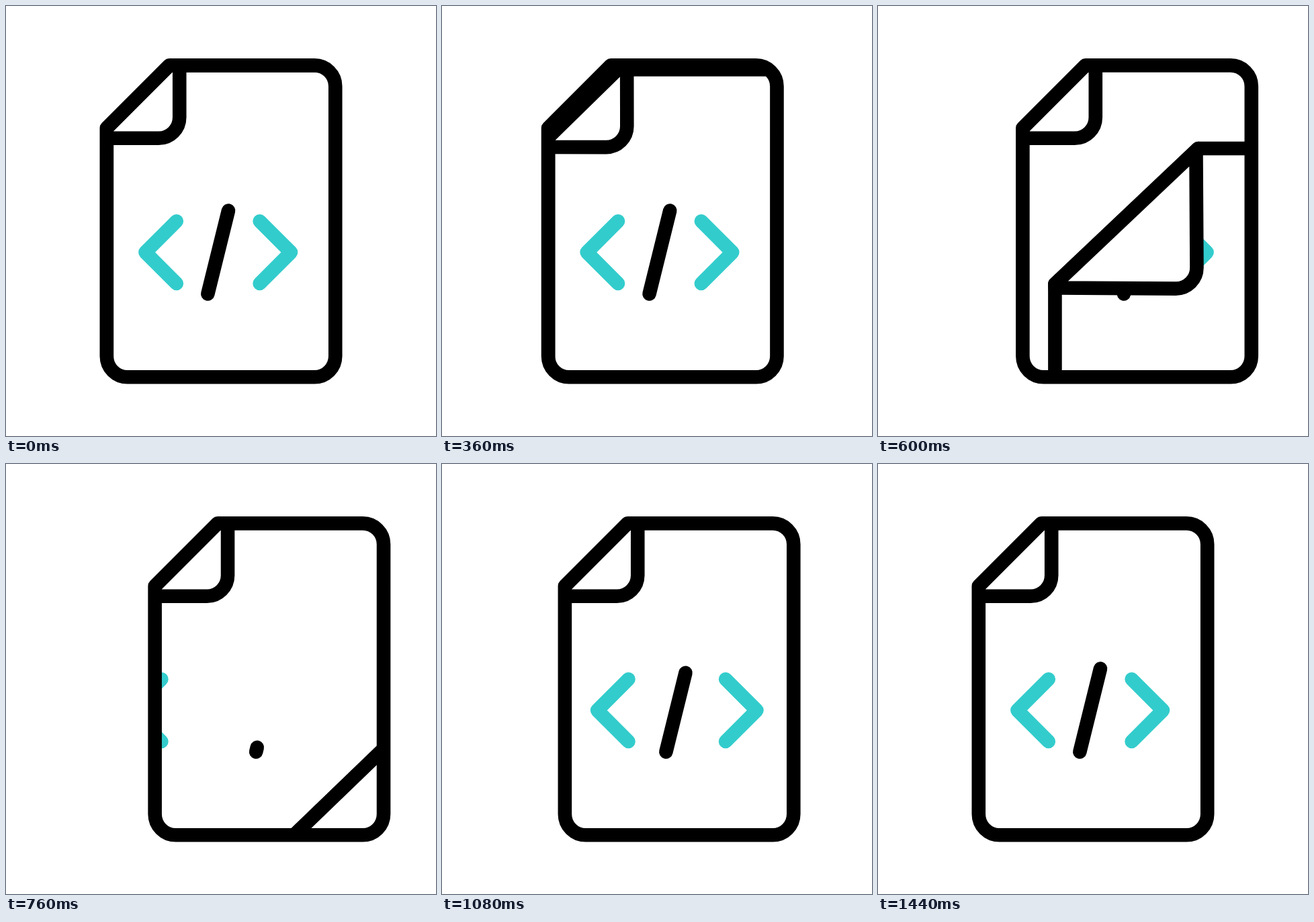
An HTML page with a canvas for the animation above (2 s loop, 640 by 640 pixels).

```html
<!DOCTYPE html>
<html lang="en">
<head>
<meta charset="utf-8">
<title>Code file</title>
<style>
  html, body { margin: 0; width: 100%; height: 100%; overflow: hidden; background: #fff; }
  canvas { display: block; width: 100vw; height: 100vh; }
</style>
</head>
<body>
<canvas id="stage" width="640" height="640"></canvas>
<script>
const ctx = document.getElementById('stage').getContext('2d');
const LOOP = 2000, STEP = 40;
const INK = '#000', TEAL = '#33cccc', LINE = 20.6;
const LEFT = 149.8, RIGHT = 490.2, TOP = 88.4, BOTTOM = 552.3, CUT = 93.2, RADIUS = 31;

// Sheet geometry during the peel:
// [progress, left, top, fold width, fold height, flap dx, flap dy, flap tilt]
const PEEL = [
  [0, LEFT, TOP, CUT, CUT, 15.2, 15.2, 0],
  [0.108, LEFT, 121.5, 149.4, 137.5, 8, 11, 1],
  [0.387, 198, 212.3, 213.4, 202, -2, 7, 1.2],
  [1, 298, 402, 346, 335, -23, -2, 1.2]
];

// Cubic bezier (0.6, 0, 0.2, 1) over a time span
function ease(t, start, end) {
  const x = (t - start) / (end - start);
  if (x <= 0) return 0;
  if (x >= 1) return 1;
  let lo = 0, hi = 1, s = 0.5;
  for (let i = 0; i < 24; i++) {
    s = (lo + hi) / 2;
    const r = 1 - s;
    if (1.8 * s * r * r + 0.6 * s * s * r + s * s * s < x) lo = s; else hi = s;
  }
  return s * s * (3 - 2 * s);
}

function peelAt(p) {
  let i = 1;
  while (i < PEEL.length - 1 && p > PEEL[i][0]) i++;
  const a = PEEL[i - 1], b = PEEL[i];
  const k = (p - a[0]) / (b[0] - a[0]);
  return a.map((v, j) => v + (b[j] - v) * k).slice(1);
}

function poly(...pts) {
  const path = new Path2D();
  pts.forEach(([x, y], i) => i ? path.lineTo(x, y) : path.moveTo(x, y));
  return path;
}

function stroke(path, color = INK) {
  ctx.strokeStyle = color;
  ctx.stroke(path);
}

function fill(path) {
  ctx.fillStyle = '#fff';
  ctx.fill(path);
}

function pagePath() {
  const path = new Path2D();
  path.moveTo(LEFT + CUT, TOP);
  path.arcTo(RIGHT, TOP, RIGHT, BOTTOM, RADIUS);
  path.arcTo(RIGHT, BOTTOM, LEFT, BOTTOM, RADIUS);
  path.arcTo(LEFT, BOTTOM, LEFT, TOP, RADIUS);
  path.lineTo(LEFT, TOP + CUT);
  path.closePath();
  return path;
}
const PAGE = pagePath();

function drawFlap(left, top, w, h, dx, dy, tilt) {
  const x = left + w + dx, y = top + h + dy;
  // keep the upper end of the flap on or below the fold line
  const inset = Math.max(0, tilt - dx);
  const path = poly([left, top + h], [left + w, top], [x - tilt, top + inset * h / w]);
  path.arcTo(x, y, left, y - tilt, RADIUS);
  path.lineTo(left, y - tilt);
  path.closePath();
  fill(path);
  stroke(path);
}

function drawCode(dxLeft, dxRight, grow) {
  const chevron = (tip, end) => stroke(poly([end, 320.2], [tip, 366.6], [end, 413]), TEAL);
  chevron(207.4 + dxLeft, 253.8 + dxLeft);
  chevron(424 + dxRight, 377.6 + dxRight);
  if (grow > 0) stroke(poly([300.3, 428.5], [300.3 + 30.7 * grow, 428.5 - 124 * grow]));
}

function drawSheet(p) {
  const [left, top, w, h, ...flap] = peelAt(p);
  const far = 900;
  const body = poly([left, far], [left, top + h], [left + w, top], [far, top], [far, far]);
  fill(body);
  ctx.save();
  ctx.clip(body);
  drawCode(0, 0, 1);
  ctx.restore();
  stroke(body);
  drawFlap(left, top, w, h, ...flap);
}

function draw(t) {
  ctx.fillStyle = '#fff';
  ctx.fillRect(0, 0, 640, 640);
  ctx.lineWidth = LINE;
  ctx.lineCap = ctx.lineJoin = 'round';
  ctx.save();
  ctx.translate(72 * (ease(t, 200, 800) - ease(t, 800, 1440)), 0);

  ctx.save();
  ctx.clip(PAGE);
  const away = 1 - ease(t, 560, 1340);
  drawCode(-105 * away, 128 * away, ease(t, 640, 1240));
  drawFlap(...PEEL[0].slice(1));
  if (t < 1160) drawSheet(ease(t, 240, 1160));
  ctx.restore();

  stroke(PAGE);
  ctx.restore();
}

const start = performance.now();
function tick() {
  const t = (performance.now() - start) % LOOP;
  draw(Math.floor(t / STEP) * STEP);
  requestAnimationFrame(tick);
}
tick();
</script>
</body>
</html>
```
